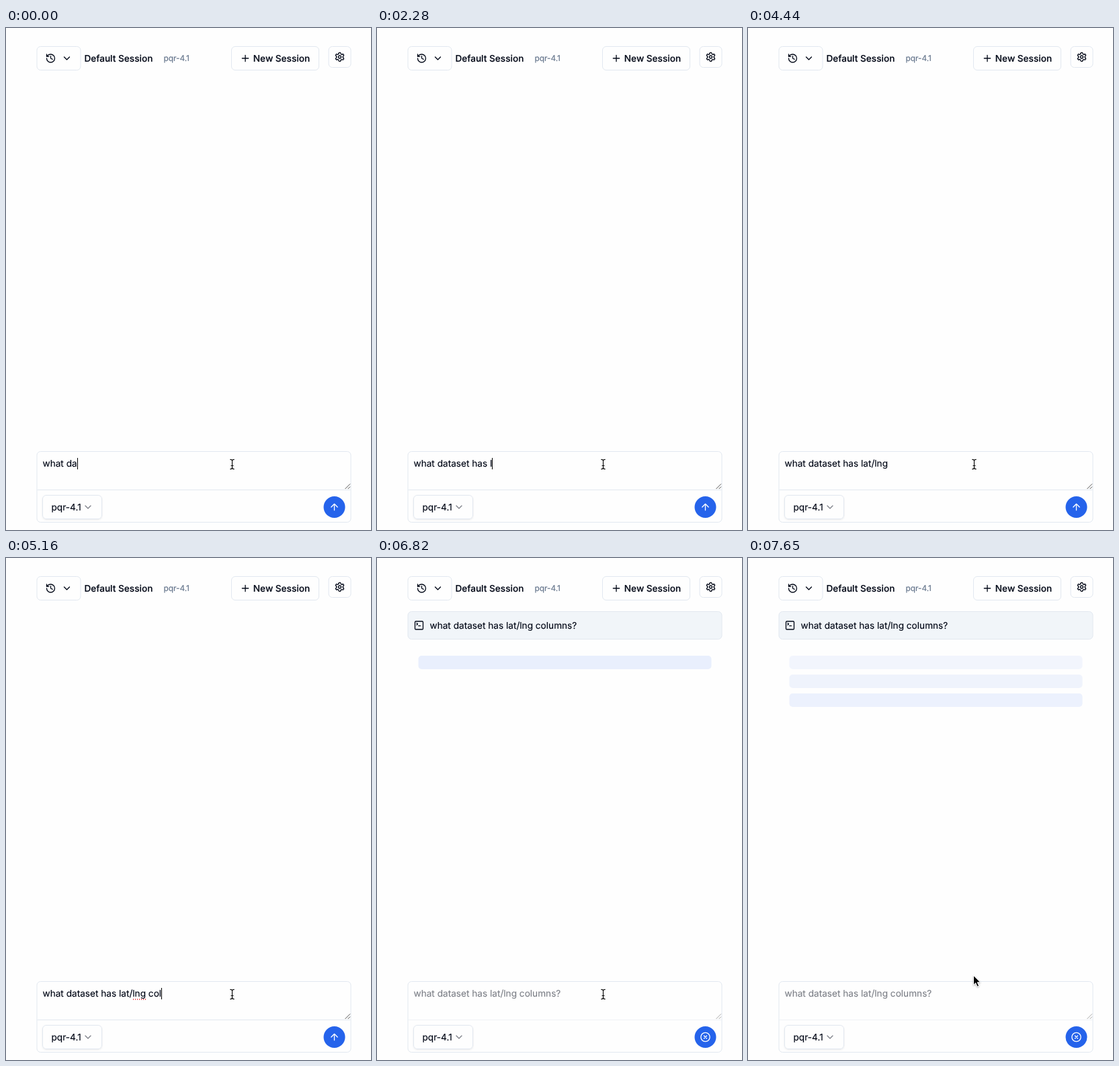
Animation, 543 px wide and 745 px high, one loop 8 s. Source, as an HTML page:

```html
<!DOCTYPE html>
<html lang="en">
<head>
<meta charset="utf-8">
<title>Chat session</title>
<style>
  html, body { margin: 0; width: 100%; height: 100%; overflow: hidden; background: #fefefe; }
  #stage { position: relative; width: 543px; height: 745px; overflow: hidden; }
  svg { position: absolute; inset: 0; }
  text, #input { font: 400 13.63px Inter, sans-serif; fill: #020817; color: #020817; text-rendering: geometricPrecision; }
  text { stroke: #020817; stroke-width: .15px; }
  #input { -webkit-text-stroke: .15px #020817; }
  .medium { font-weight: 500; }
  .note { font-size: 11.9px; fill: #64748b; stroke: #64748b; }
  .box { fill: #fefefe; stroke: #e2e8f0; }
  .icon { fill: none; stroke: #020817; stroke-width: 2; stroke-linecap: round; stroke-linejoin: round; }
  .white { stroke: #fff; }
  .bar { fill: #e9effd; }
  #input { position: absolute; left: 54.5px; top: 637px; height: 20px; line-height: 20px; white-space: pre; }
  #caret { display: inline-block; width: 1px; height: 17px; margin: 1px -1px 0 0; vertical-align: top; background: #000; }
  #word { position: relative; }
  .marked::after {
    content: ""; position: absolute; left: 0; right: 0; bottom: -1px; height: 2px;
    background: radial-gradient(circle, #f0464b 0.8px, transparent 1.1px) 0 0 / 3px 2px;
  }
</style>
</head>
<body>
<div id="stage">
  <svg width="543" height="745">
    <defs>
      <path id="tooth" d="M9.78 4a2 2 0 0 1 2-2h.44a2 2 0 0 1 2 2v.18a2 2 0 0 0 1 1.73l.43.25a2 2 0 0 0 2 0l.15-.08"/>
      <path id="chevron" d="m6 9 6 6 6-6"/>
      <path id="ibeam" d="M333.8 640.4q2.7 0 2.7 2v10.2q0 2-2.7 2M339.2 640.4q-2.7 0-2.7 2v10.2q0 2 2.7 2M335 649.5h3"/>
      <filter id="soft" x="-20%" y="-20%" width="140%" height="150%">
        <feDropShadow dx="0" dy="1" stdDeviation="1" flood-opacity=".08"/>
      </filter>
      <filter id="shade" x="-50%" y="-50%" width="200%" height="200%">
        <feDropShadow dx="0" dy="1" stdDeviation=".9" flood-opacity=".35"/>
      </filter>
    </defs>

    <!-- header -->
    <rect class="box" x="46" y="27.5" width="65" height="35" rx="5.5"/>
    <g class="icon" transform="translate(58.5 37) scale(.6667)">
      <path d="M3 12a9 9 0 1 0 9-9 9.75 9.75 0 0 0-6.74 2.74L3 8M3 3v5h5M12 7v5l4 2"/>
    </g>
    <use href="#chevron" class="icon" transform="translate(82.5 37) scale(.6667)"/>
    <text class="medium" x="116.4" y="50">Default Session</text>
    <text class="note" x="234.4" y="49">pqr-4.1</text>
    <rect class="box" x="335.5" y="27.5" width="130" height="35" rx="5.5"/>
    <path class="icon" transform="translate(348 37) scale(.6667)" d="M5 12h14M12 5v14"/>
    <text class="medium" x="367.8" y="50">New Session</text>
    <rect class="box" x="480" y="27.5" width="33" height="31" rx="5.5"/>
    <g class="icon" transform="translate(488.5 35) scale(.6667)">
      <use href="#tooth"/>
      <use href="#tooth" transform="rotate(60 12 12)"/>
      <use href="#tooth" transform="rotate(120 12 12)"/>
      <use href="#tooth" transform="rotate(180 12 12)"/>
      <use href="#tooth" transform="rotate(240 12 12)"/>
      <use href="#tooth" transform="rotate(300 12 12)"/>
      <circle cx="12" cy="12" r="3"/>
    </g>

    <!-- conversation -->
    <g id="message">
      <rect class="box" x="46" y="79.5" width="467" height="41" rx="5.5" style="fill:#f1f5f9"/>
      <g class="icon" transform="translate(54.5 92) scale(.6667)">
        <rect x="3" y="3" width="18" height="18" rx="2"/>
        <path d="m7 11 2-2-2-2M11 13h4"/>
      </g>
      <text x="78.5" y="105">what dataset has lat/lng columns?</text>
    </g>
    <rect class="bar" x="61.5" y="145" width="436" height="20" rx="5"/>
    <rect class="bar" x="61.5" y="173" width="436" height="20" rx="5"/>
    <rect class="bar" x="61.5" y="201" width="436" height="20" rx="5"/>

    <!-- composer -->
    <rect class="box" x="46" y="628.5" width="467" height="105" rx="5.5"/>
    <g id="field" fill="none">
      <path d="M46.5 685.5h466" stroke="#e2e8f0"/>
      <path d="M504.5 684l7.5-7.5M508.7 684l3.3-3.3" stroke="#555"/>
    </g>
    <rect class="box" x="54.5" y="693.5" width="88" height="35" rx="5.5" filter="url(#soft)"/>
    <text x="67.5" y="716">pqr-4.1</text>
    <use href="#chevron" class="icon" opacity=".5" transform="translate(114 703) scale(.6667)"/>
    <circle cx="488.5" cy="711" r="16" fill="#2563eb"/>
    <g transform="translate(480.5 703) scale(.6667)">
      <path id="send" class="icon white" d="m5 12 7-7 7 7M12 19V5"/>
      <g id="stop" class="icon white">
        <circle cx="12" cy="12" r="10"/>
        <path d="m15 9-6 6M9 9l6 6"/>
      </g>
    </g>
  </svg>

  <div id="input"><span id="before"></span><span id="word"></span><span id="after"></span><i id="caret"></i></div>

  <svg width="543" height="745">
    <g id="beam" fill="none" stroke-linecap="round">
      <use href="#ibeam" stroke="#fff" stroke-width="2.6"/>
      <use href="#ibeam" stroke="#000" stroke-width="1.1"/>
    </g>
    <path id="arrow" d="M0 0v14.2l3.2-3 2.4 5.5 2.5-1.1-2.4-5.3h4.4z" stroke="#fff" stroke-width="1" filter="url(#shade)"/>
  </svg>
</div>

<script>
const LOOP = 8000;
const PROMPT = "what dataset has lat/lng columns?";
const TYPED_AT_START = 7;
const WORD_START = PROMPT.indexOf("lng"), WORD_END = WORD_START + 3;
const KEYS = [120, 240, 840, 960, 1080, 1200, 1440, 1560, 1680, 1800, 2280, 2400, 2640, 2760,
  3000, 3720, 3840, 4800, 4920, 5040, 5160, 5640, 5870, 5990, 6220, 6460];
const CARET_OFF = [[720, 840], [3480, 3720], [4440, 4800]];
const SENT = 6700;
const BAR_STARTS = [6820, 7050, 7290];
const POINTER = [[7410, 336, 654], [7530, 336, 640], [7650, 335.5, 619.5]];

const $ = id => document.getElementById(id);
const bars = document.querySelectorAll(".bar");
const show = (el, on) => { el.style.visibility = on ? "visible" : "hidden"; };
const pulse = ms => 0.75 + 0.25 * Math.cos(Math.PI * ms / 1000);

function drawInput(t, sent) {
  const count = TYPED_AT_START + KEYS.filter(k => k <= t).length;
  const text = PROMPT.slice(0, count);
  $("before").textContent = text.slice(0, WORD_START);
  $("word").textContent = text.slice(WORD_START, WORD_END);
  $("after").textContent = text.slice(WORD_END);
  $("word").className = count > WORD_END && !sent ? "marked" : "";
  show($("caret"), !sent && !CARET_OFF.some(([a, b]) => t >= a && t < b));
  $("input").style.opacity = $("field").style.opacity = sent ? 0.5 : 1;
}

function draw(t) {
  const sent = t >= SENT;
  drawInput(t, sent);
  show($("message"), sent);
  show($("send"), !sent);
  show($("stop"), sent);
  bars.forEach((bar, i) => {
    const age = t - BAR_STARTS[i];
    show(bar, age >= 0);
    bar.style.opacity = pulse(Math.max(0, age));
  });
  const spot = POINTER.filter(p => p[0] <= t).pop();
  show($("beam"), !spot);
  show($("arrow"), !!spot);
  if (spot) $("arrow").setAttribute("transform", `translate(${spot[1]} ${spot[2]})`);
}

const start = performance.now();
function tick() {
  draw((performance.now() - start) % LOOP);
  requestAnimationFrame(tick);
}
tick();
</script>
</body>
</html>
```
